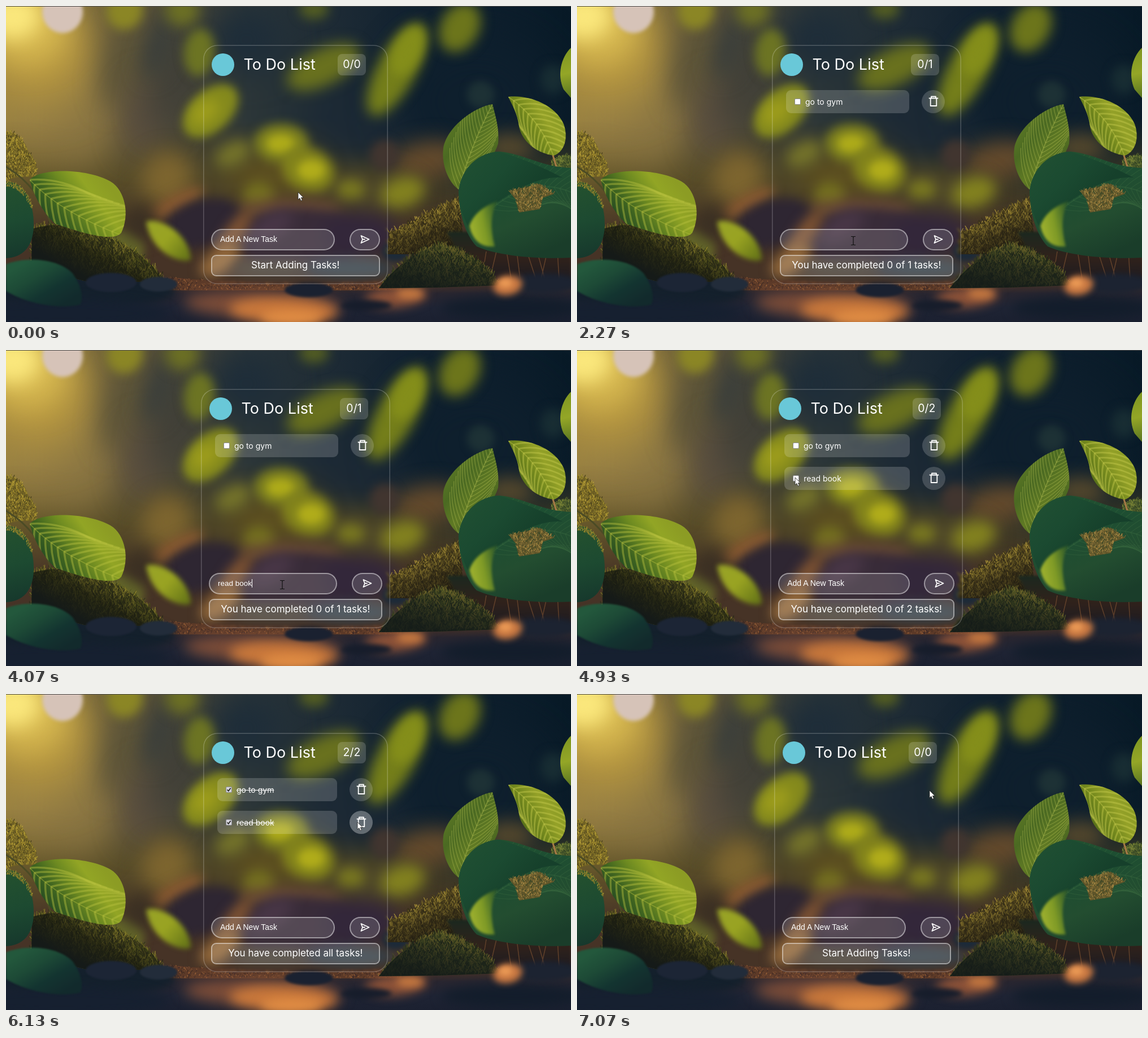
These frames come from a looping animation (1000 by 560 pixels, 7.14 s). An HTML page with a canvas:

```html
<!DOCTYPE html>
<html lang="en">
<head>
<meta charset="utf-8">
<title>To Do List</title>
<style>
html, body { margin: 0; width: 100%; height: 100%; overflow: hidden; background: #141d28; }
#stage { position: relative; width: 1000px; height: 560px; overflow: hidden; color: #fff; font-family: Inter, sans-serif; cursor: none; }
#stage * { box-sizing: border-box; }
canvas { position: absolute; left: 0; top: 0; }
#panel { --w: 163.5px; position: absolute; left: calc(512.5px - var(--w)); top: 68.5px; width: calc(2 * var(--w)); height: 424px;
  border-radius: 25px; box-shadow: inset 0 0 0 1.5px #ffffff38; backdrop-filter: blur(2px); }
#panel > *, .task > * { position: absolute; }
#logo { left: 14.5px; top: 15.5px; width: 40px; height: 40px; border-radius: 50%; background: #69c8d8; }
#title { left: 71.5px; top: 15px; font-size: 27px; line-height: 40px; white-space: nowrap; }
#badge { right: 39px; top: 16.5px; width: 50px; height: 38px; border-radius: 8px; background: #ffffff2b; font-size: 19.5px; line-height: 37px; text-align: center; }
.glass { height: 38px; border: 2px solid #ffffff70; background: #ffffff24; }
#field { left: 14px; right: 94px; top: 326px; border-radius: 19px; padding-left: 14px; font: 13.5px/33px "Liberation Sans", Arial, sans-serif; white-space: pre; }
#field.hint { font-size: 14px; }
#caret { display: inline-block; width: 1px; height: 15px; background: #fff; vertical-align: -3px; }
#send { right: 14.5px; top: 326px; width: 54px; border-radius: 19px; }
#send svg { position: absolute; left: 17px; top: 8px; }
#message { left: 14px; right: 14.5px; top: 372px; border-radius: 9px; font-size: 17px; line-height: 33px; text-align: center; white-space: nowrap; }
.task { left: 25px; right: calc(var(--w) / 2 + 8.25px); height: 41px; border-radius: 9px; background: #ffffff2c; }
.task b { left: 15px; top: 15px; width: 11px; height: 11px; border: 1px solid #8a8a90; border-radius: 2px; background: #fff; }
.task b svg { display: none; position: absolute; left: 0; top: 0; }
.task.done b { background: #d4d3da; }
.task.done b svg { display: block; }
.task span { left: 34px; top: 0; font-size: 14px; line-height: 41px; white-space: nowrap; }
.task.done span { text-decoration: line-through; }
.task i { right: -62.5px; top: 0; width: 41px; height: 41px; border-radius: 50%; background: #ffffff2c; }
.task i svg { position: absolute; left: 12px; top: 10px; }
.task i.hover { background: #ffffff50; }
#gym { top: 80.5px; }
#book { top: 138.5px; }
.pointer { position: absolute; left: 0; top: 0; overflow: visible; }
.line { fill: none; stroke: #fff; stroke-width: 1.8; stroke-linejoin: round; stroke-linecap: round; }
</style>
</head>
<body>
<div id="stage">
  <canvas id="scene" width="1000" height="560"></canvas>
  <div id="panel">
    <div id="logo"></div>
    <div id="title">To Do List</div>
    <div id="badge"></div>
    <div id="gym" class="task"></div>
    <div id="book" class="task"></div>
    <div id="field" class="glass"></div>
    <div id="send" class="glass"><svg width="17" height="17"><path class="line" d="M1.5 2L15.5 8.5L1.5 15L4 8.5ZM4 8.5H8"/></svg></div>
    <div id="message" class="glass"></div>
  </div>
  <svg id="arrow" class="pointer" width="12" height="18"><path d="M0 0V13L3 10.4L5 15.2L7.4 14.2L5.4 9.6H9.4Z" fill="#fff" stroke="#222" stroke-width=".8"/></svg>
  <svg id="beam" class="pointer" width="8" height="16"><path d="M-4 -7.5H-1L0 -6.5L1 -7.5H4M0 -6.5V6.5M-4 7.5H-1L0 6.5L1 7.5H4" fill="none" stroke="#111" stroke-width="1.2"/></svg>
</div>
<script>
const $ = id => document.getElementById(id);
const ctx = $('scene').getContext('2d');
let seed = 7;
const rand = (lo = 0, hi = 1) => {
  seed = (seed * 16807) % 2147483647;
  return lo + (hi - lo) * seed / 2147483647;
};

// Scenery
function blob(color, x, y, rx, ry, angle = 0, blur = 12) {
  ctx.filter = blur ? `blur(${blur}px)` : 'none';
  ctx.fillStyle = color;
  ctx.beginPath();
  ctx.ellipse(x, y, rx, ry, angle, 0, 7);
  ctx.fill();
  ctx.filter = 'none';
}

function gradient(x0, y0, x1, y1, ...colors) {
  const fill = ctx.createLinearGradient(x0, y0, x1, y1);
  colors.forEach((c, i) => fill.addColorStop(i / (colors.length - 1), c));
  return fill;
}

function shape(d, fill, blur = 0) {
  ctx.filter = blur ? `blur(${blur}px)` : 'none';
  ctx.fillStyle = fill;
  ctx.fill(new Path2D(d));
  ctx.filter = 'none';
}

// Leaf with a curved midrib and side veins leaning towards its end.
function leaf(d, fill, [x0, y0, cx, cy, x1, y1], vein, width, count, reach, spread = 0.9) {
  const path = new Path2D(d);
  ctx.save();
  ctx.fillStyle = fill;
  ctx.fill(path);
  ctx.clip(path);
  ctx.strokeStyle = vein;
  ctx.lineWidth = width;
  for (let i = 0; i < count; i++) {
    const t = i / count, u = 1 - t;
    const x = u * u * x0 + 2 * u * t * cx + t * t * x1;
    const y = u * u * y0 + 2 * u * t * cy + t * t * y1;
    const dir = Math.atan2(u * (cy - y0) + t * (y1 - cy), u * (cx - x0) + t * (x1 - cx));
    for (const side of [-spread, spread]) {
      const a = dir + side, b = dir + side * 0.65;
      ctx.beginPath();
      ctx.moveTo(x, y);
      ctx.quadraticCurveTo(x + reach / 2 * Math.cos(a), y + reach / 2 * Math.sin(a), x + reach * Math.cos(b), y + reach * Math.sin(b));
      ctx.stroke();
    }
  }
  ctx.lineWidth = 1.8;
  ctx.beginPath();
  ctx.moveTo(x0, y0);
  ctx.quadraticCurveTo(cx, cy, x1, y1);
  ctx.stroke();
  ctx.restore();
}

// Short random blades rooted inside a shape, with an optional shade over it.
function moss(d, base, [x0, y0, x1, y1], colors, count, length, shade) {
  const path = new Path2D(d);
  if (base) { ctx.fillStyle = base; ctx.fill(path); }
  for (let i = 0; i < count; i++) {
    const x = rand(x0, x1), y = rand(y0, y1);
    if (!ctx.isPointInPath(path, x, y)) continue;
    ctx.strokeStyle = colors[Math.floor(rand(0, colors.length))];
    ctx.lineWidth = rand(0.6, 1.6);
    ctx.beginPath();
    ctx.moveTo(x, y);
    ctx.lineTo(x + rand(-0.6, 0.6) * length, y - rand(0.3, 1) * length);
    ctx.stroke();
  }
  if (shade) { ctx.fillStyle = shade; ctx.fill(path); }
}

function paintBackdrop() {
  ctx.fillStyle = gradient(0, 0, 1000, 0, '#96803f', '#75663c', '#4e4a38', '#2c3638', '#1e2b35', '#122230', '#0d1e2c', '#081a27');
  ctx.fillRect(0, 0, 1000, 560);
  ctx.fillStyle = gradient(0, 200, 0, 400, '#54482200', '#544822b0', '#463326');
  ctx.fillRect(0, 0, 1000, 560);
  shape('M0 60L110 40L215 215L150 290L0 260Z', '#9a824a90', 28);
  [
    ['#b8983f', 55, 75, 100, 95, 0.4, 40], ['#d9bb52', 35, 35, 75, 65, 0, 26], ['#fae77c', 12, 18, 48, 40, 0, 16],
    ['#5b5339', 205, 95, 26, 85, 0.25, 24], ['#5c4f40', 245, 195, 36, 70, 0.2, 26], ['#403f38', 310, 120, 40, 110, 0.4, 30],
    ['#3a3e3b', 270, 70, 22, 60, 0.3, 18], ['#1e2d39', 425, 60, 70, 60, 0, 28], ['#1c2935', 640, 215, 95, 55, 0, 28],
    ['#0e1f2d', 830, 170, 140, 120, 0, 40], ['#5e5020', 470, 300, 85, 40, 0, 24], ['#644a2c', 745, 275, 65, 34, -0.2, 18],
    ['#55482c', 890, 250, 45, 25, 0, 16], ['#50492a', 640, 330, 90, 34, 0, 22], ['#7d652f', 285, 305, 45, 48, 0.5, 18]
  ].forEach(b => blob(...b));
  [
    ['#d6c3b8', 100, 10, 36, 38, 0, 3], ['#8b8625', 210, 8, 32, 34, 0.4, 9], ['#6c7024', 312, 8, 30, 28, 0, 12],
    ['#6c7423', 342, 82, 27, 42, 0.1, 9], ['#535d22', 545, 5, 26, 18, 0, 10], ['#6c751b', 803, 38, 34, 46, 0.5, 11],
    ['#747e1a', 692, 112, 34, 92, 0.5, 11], ['#848e1a', 710, 80, 24, 46, 0.45, 9], ['#69711e', 562, 108, 70, 32, -0.45, 12],
    ['#858a1d', 362, 186, 58, 36, -0.75, 8], ['#9c9c1c', 352, 188, 28, 18, -0.7, 10], ['#7f821f', 487, 243, 48, 34, 0, 9],
    ['#aeab1a', 486, 244, 25, 16, 0, 7], ['#83841c', 535, 290, 48, 38, 0.4, 9], ['#b0ac1a', 540, 291, 24, 18, 0, 7],
    ['#75742a', 402, 262, 34, 20, -0.5, 12], ['#41352f', 670, 265, 26, 28, 0, 8], ['#1d3135', 840, 157, 24, 24, 0, 7],
    ['#182d33', 968, 130, 22, 26, 0, 9], ['#74701f', 447, 336, 27, 24, 0, 10], ['#82811f', 702, 330, 40, 26, -0.3, 12],
    ['#777620', 610, 325, 25, 18, 0, 10]
  ].forEach(b => blob(...b));
  [
    ['#6b4b36', 500, 362, 95, 20, 0, 12], ['#8a5a31', 300, 352, 55, 16, -0.5, 10], ['#2e2632', 346, 385, 72, 42, -0.3, 9],
    ['#392c39', 520, 416, 110, 58, 0, 9], ['#493747', 470, 390, 42, 20, -0.5, 12], ['#33273a', 625, 405, 70, 42, 0, 15],
    ['#7d5233', 402, 405, 16, 48, 0.6, 10], ['#93693b', 378, 452, 40, 20, -0.6, 10], ['#484137', 475, 466, 75, 17, 0, 10],
    ['#35414a', 610, 465, 80, 18, 0, 10], ['#64672a', 210, 430, 35, 34, 0.5, 8], ['#3b3023', 240, 385, 32, 30, 0, 14],
    ['#1c2a38', 690, 435, 24, 18, 0, 5]
  ].forEach(b => blob(...b));
}

function paintGround() {
  ctx.fillStyle = gradient(0, 484, 0, 560, '#3b2b2b00', '#292630', '#1f2434', '#1b2030');
  ctx.fillRect(0, 484, 1000, 76);
  moss('M260 478Q480 500 700 486V504H280Z', '#5c3a28', [260, 478, 700, 504], ['#9a6238', '#402b22', '#764c31', '#39282a'], 1500, 3);
  [
    ['#14202c', 130, 505, 170, 34, 0, 7], ['#7d4d38', 455, 530, 140, 24, 0.04, 12], ['#c9783b', 490, 540, 95, 22, 0.04, 10],
    ['#e08c43', 505, 552, 55, 12, 0, 8], ['#8c5238', 690, 516, 55, 18, -0.1, 9], ['#c67940', 715, 510, 24, 9, 0, 7],
    ['#162030', 100, 545, 190, 26, 0, 9], ['#171d2b', 638, 531, 45, 10, 0, 4], ['#1a2130', 536, 503, 43, 13, 0, 2],
    ['#131d2b', 900, 535, 130, 22, 0, 10]
  ].forEach(b => blob(...b));
}

function paintLeft() {
  shape('M248 382C275 374 326 405 327 450C302 457 255 432 248 382Z', gradient(248, 382, 320, 445, '#98a327', '#99a322', '#687718'), 4);
  moss('M0 222Q30 225 40 260Q60 280 52 304Q20 300 0 310Z', '#6f6024', [0, 220, 58, 308], ['#a18a2c', '#b09a36', '#4b431c', '#83752b'], 900, 5);
  ctx.strokeStyle = '#4b4b25';
  ctx.lineWidth = 3;
  ctx.stroke(new Path2D('M0 285Q60 320 82 395'));
  moss('M46 395Q100 378 160 402Q235 425 283 488L150 490L110 480L45 460Z', '#39371a', [45, 380, 285, 490],
    ['#626020', '#8b812c', '#444719', '#2b2d18', '#706724'], 3800, 10, gradient(170, 398, 130, 475, '#17190f00', '#17190fc0', '#151a18'));
  blob('#1c2535', 186, 490, 45, 17, 0, 1.5);
  blob('#222c3a', 270, 493, 33, 13, 0, 1.5);
  leaf('M42 308C62 286 145 288 185 311C212 327 219 372 204 402C188 421 120 397 87 386C68 368 50 340 42 308Z',
    gradient(75, 385, 175, 310, '#244a22', '#3f6420', '#6d8a21', '#92a525', '#8c9c24'), [42, 308, 95, 365, 204, 406], '#b6c03f70', 3.5, 13, 110);
  shape('M0 312C28 309 50 342 49 390C48 428 28 446 0 447Z', gradient(0, 312, 30, 447, '#24512e', '#1d4a31', '#16372c'));
  moss('M0 310Q37 315 48 360L43 358Q27 322 0 320Z', '', [0, 308, 50, 360], ['#9b8b2e', '#76712b'], 700, 4);
  shape('M0 458C30 444 92 446 118 474Q140 505 132 529C90 539 32 525 0 505Z', gradient(40, 450, 90, 535, '#23583c', '#1d4a36', '#133430', '#122a2c'), 1.5);
}

function paintRight() {
  moss('M678 400Q705 395 740 370Q775 355 800 340L812 430L760 440L675 440Z', '#4a3d1c', [675, 340, 815, 442],
    ['#81702a', '#a48d37', '#55491e', '#352f18'], 2600, 9, gradient(740, 370, 765, 435, '#1c181000', '#1c181080', '#1c1810d8'));
  shape('M780 400H1000V490H830Z', gradient(0, 400, 0, 490, '#1b281f', '#30221b', '#1c1b22'), 2);
  ctx.strokeStyle = '#60402a';
  ctx.lineWidth = 1.5;
  for (let i = 0; i < 8; i++) {
    const x = 850 + i * 18;
    ctx.stroke(new Path2D(`M${x} 435L${x + rand(-14, 18)} 490`));
  }
  moss('M660 500Q700 445 765 422Q840 435 874 495L760 499Z', '#2a311b', [658, 420, 876, 500],
    ['#4b5124', '#656128', '#333b1c', '#20271a', '#6a602a'], 3400, 10, gradient(770, 425, 755, 495, '#131a1800', '#131a1890', '#131a18e0'));
  blob('#1c2331', 950, 492, 65, 18, 0, 4);
  blob('#c87842', 888, 495, 26, 17, -0.2, 6);
  blob('#ea9955', 884, 491, 12, 8, 0, 5);
  shape('M1000 74C982 91 975 123 987 148L1000 163Z', gradient(980, 80, 1000, 160, '#7f9722', '#94a627', '#5d7821'));
  moss('M965 275Q985 260 1000 266V288H965Z', '#48572a', [965, 260, 1000, 288], ['#768036', '#354625'], 250, 5);
  ctx.strokeStyle = '#a57946';
  ctx.lineWidth = 3;
  ctx.stroke(new Path2D('M966 258L975 288'));
  leaf('M861 174C832 178 781 212 774 252C770 285 786 315 801 325C818 311 860 282 871 244C874 220 866 194 861 174Z',
    gradient(780, 210, 865, 280, '#5c7825', '#4b6a22', '#607a24', '#3b5a1f'), [801, 325, 824, 245, 861, 174], '#a3b14a80', 1.2, 17, 75, 0.75);
  leaf('M889 161C921 157 970 172 987 209C996 235 988 258 970 265C938 261 912 238 908 213C905 190 896 176 889 161Z',
    gradient(910, 225, 975, 185, '#577019', '#73881d', '#94a128', '#899a24'), [889, 161, 942, 196, 969, 265], '#c3c84b70', 3, 11, 65);
  leaf('M801 329C803 299 826 260 873 258C914 261 950 286 1000 287V446C942 449 870 443 833 426C812 404 802 366 801 329Z',
    gradient(850, 260, 930, 445, '#22502f', '#1d4e32', '#234d30', '#1a3d2a'), [858, 360, 930, 300, 1000, 330], '#3b6b4060', 1.2, 14, 100);
  shape('M801 329C805 290 838 259 873 258Q930 275 985 304C935 300 888 337 865 350Q835 370 822 398Q804 370 801 329Z', gradient(820, 270, 900, 350, '#1f4f32', '#1b4a31', '#16402b'));
  shape('M820 390Q830 360 870 346Q852 376 865 426Q830 430 820 390Z', gradient(820, 390, 870, 380, '#a0b22f', '#7f9a26', '#345e2a'), 2);
  moss('M890 328L945 315L970 333L950 340L945 360L908 366L902 343Z', '#5e5429', [888, 313, 972, 368], ['#957a3a', '#726232', '#3f4928', '#a88b47'], 900, 5);
}

paintBackdrop();
paintGround();
paintLeft();
paintRight();
ctx.fillStyle = '#4a4a4a';
ctx.fillRect(0, 0, 1000, 1);

// Interface
const LOOP = 7140;
const names = { gym: 'go to gym', book: 'read book' };
const tick = '<svg width="9" height="9"><path d="M1.5 4.5L3.7 7L7.6 1.8" fill="none" stroke="#222" stroke-width="1.7"/></svg>';
const trash = '<svg width="18" height="20"><path class="line" d="M1.5 4.5H16.5M5 4V1.5H13V4M3.7 5V18H14.3V5"/></svg>';
for (const id in names) $(id).innerHTML = `<b>${tick}</b><span>${names[id]}</span><i>${trash}</i>`;

// Pointer stops: arrival time, x, y
const stops = [[130, 517, 330], [670, 489, 416], [4340, 489, 416], [4860, 386, 226], [5070, 386, 226], [5430, 390, 170],
  [5540, 390, 170], [6060, 622, 227], [6340, 622, 227], [6600, 624, 171]];

function pointerAt(t) {
  const next = stops.findIndex(s => s[0] > t);
  if (next < 1) return (next ? stops[stops.length - 1] : stops[0]).slice(1);
  const [a, b] = [stops[next - 1], stops[next]];
  const p = (t - a[0]) / (b[0] - a[0]), e = p * p * (3 - 2 * p);
  return [a[1] + (b[1] - a[1]) * e, a[2] + (b[2] - a[2]) * e];
}

const typed = (text, t, start, step) => text.slice(0, Math.max(0, Math.floor((t - start) / step) + 1));

function render(t) {
  const shown = { gym: t >= 2270 && t < 6730, book: t >= 4270 && t < 6340 };
  const checked = { gym: t >= 5470, book: t >= 5000 };
  const ids = Object.keys(names).filter(id => shown[id]);
  const total = ids.length, done = ids.filter(id => checked[id]).length;
  const [x, y] = pointerAt(t);

  const halfWidth = total === done ? 163.5 : total === 2 && !done ? 170.3 : 167.5;
  $('panel').style.setProperty('--w', halfWidth + 'px');
  $('badge').textContent = `${done}/${total}`;
  $('message').textContent = !total ? 'Start Adding Tasks!'
    : done === total ? 'You have completed all tasks!'
    : `You have completed ${done} of ${total} tasks!`;

  for (const id in names) {
    $(id).style.display = shown[id] ? 'block' : 'none';
    $(id).classList.toggle('done', checked[id]);
    const rowY = id === 'gym' ? 169.5 : 227.5;
    $(id).querySelector('i').classList.toggle('hover', Math.hypot(x - 628, y - rowY) < 20);
  }

  const focused = t >= 800 && t < 4870;
  const text = t < 2270 ? typed(names.gym, t, 1000, 120) : t < 4270 ? typed(names.book, t, 2800, 130) : '';
  const typing = (t > 1000 && t < 2200) || (t > 2800 && t < 4270);
  $('field').className = focused ? 'glass' : 'glass hint';
  $('field').innerHTML = !focused ? 'Add A New Task' : text + (typing ? '<span id="caret"></span>' : '');

  const overField = y > 395 && y < 432;
  $('arrow').style.display = overField ? 'none' : 'block';
  $('beam').style.display = overField ? 'block' : 'none';
  $('arrow').style.transform = $('beam').style.transform = `translate(${x}px, ${y}px)`;
}

const start = performance.now();
(function frame() {
  render((performance.now() - start) % LOOP);
  requestAnimationFrame(frame);
})();
</script>
</body>
</html>
```
